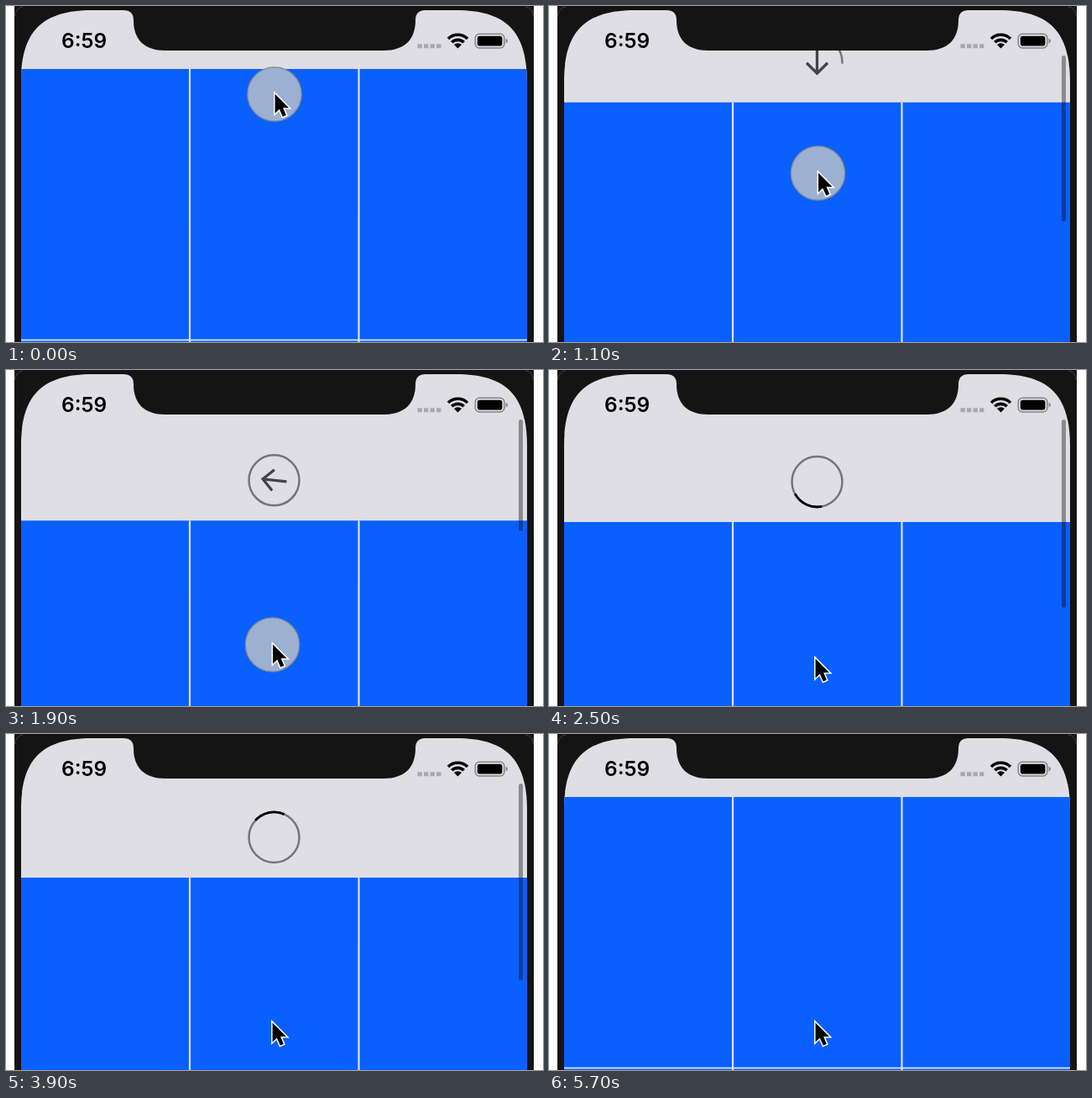
Animation, 640 px wide and 400 px high, one loop 5800 ms. Source, as an HTML page:

```html
<!DOCTYPE html>
<html lang="en">
<head>
<meta charset="utf-8">
<title>Pull to refresh</title>
<style>
  html, body { margin: 0; width: 100%; height: 100%; overflow: hidden; background: #fff; }
  svg { display: block; width: 640px; height: 400px; }
  .clock { font: 600 24.5px Inter, "Liberation Sans", sans-serif; }
</style>
</head>
<body>
<svg viewBox="0 0 640 400">
  <defs>
    <clipPath id="screen">
      <path d="M18 90C18 30 43 5 103 5H140Q152 5 152 17C152 40 165 53 190 53H450C475 53 488 40 488 17Q488 5 500 5H536C596 5 621 30 621 90V400H18Z"/>
    </clipPath>
  </defs>

  <rect x="10" width="619" height="400" fill="#141414"/>
  <path d="M10.5 12Q11 3 20 .5M628.5 12Q628 3 619 .5" fill="none" stroke="#444"/>

  <g clip-path="url(#screen)">
    <rect width="640" height="400" fill="#dfdee5"/>
    <g id="header" fill="none">
      <circle id="ring" r="30" stroke="#757479" stroke-width="2.5" pathLength="100" transform="rotate(-90)"/>
      <path id="arrow" d="M0-15V13M-12.5 1L0 13.5 12.5 1" stroke="#444347" stroke-width="3.3"/>
      <circle id="arc" r="30" stroke="#000" stroke-width="2.8" pathLength="360" stroke-dasharray="72 288"/>
    </g>
    <g id="grid">
      <rect x="18" width="603" height="400" fill="#0a5fff"/>
      <path d="M219 0V400M420.5 0V400" stroke="#dde3f4" stroke-width="2.2"/>
      <path d="M18 322.6H621" stroke="#dde3f4" stroke-width="1.8"/>
    </g>
    <rect id="bar" x="611" y="59" width="5" rx="2.5" fill="#000"/>
  </g>

  <text class="clock" x="66" y="50">6:59</text>
  <path d="M490.5 47.7H518.5" stroke="#a9a8ae" stroke-width="5" stroke-dasharray="5.4 2.1"/>
  <g transform="translate(538.5 50.5)">
    <path d="M0 0L-4.5-4.5A6.4 6.4 0 0 1 4.5-4.5Z"/>
    <path d="M-7.2-7.2A10.2 10.2 0 0 1 7.2-7.2M-11.5-11.5A16.3 16.3 0 0 1 11.5-11.5" fill="none" stroke="#000" stroke-width="3.7"/>
  </g>
  <rect x="559.3" y="33.2" width="34.6" height="16.8" rx="5" fill="none" stroke="#85848a" stroke-width="1.5"/>
  <rect x="561.8" y="35.7" width="29.6" height="11.8" rx="2.8"/>
  <path d="M595.6 38.8Q598 39.6 598 41.6T595.6 44.4Z" fill="#85848a"/>

  <circle id="touch" r="32.2" fill="#9cb0d1" stroke="#7e8894" stroke-width="1.3"/>
  <path id="cursor" d="M0 0V23L5.2 18 9.2 27 13.3 25.2 9.5 16.5H16.5Z" stroke="#fff" stroke-width="3" paint-order="stroke"/>
</svg>

<script>
const LOOP = 5800, STEP = 100;
const REST = 75, INSET = 96;
const RELEASE = 2300, DONE = 5000, HOME = 5450;
const DRAG_START = { x: 320, y: 105 };
const PULL = [ // from, to, y0, y1, x0, x1, ease
  [200, 1100, 105, 199, 320, 320.5, p => p ** 1.3],
  [1100, 1900, 199, 327, 320.5, 317.5, p => p],
  [1900, 2200, 327, 344, 317.5, 317, p => 1 - (1 - p) ** 3],
];
const SPIN = [[2500, 115], [3900, 618], [4800, 951]];

const el = id => document.getElementById(id);
const [header, ring, arrow, arc, grid, bar, touch, cursor] =
  ["header", "ring", "arrow", "arc", "grid", "bar", "touch", "cursor"].map(el);

const clamp = v => Math.min(1, Math.max(0, v));
const ramp = (t, a, b) => clamp((t - a) / (b - a));
const smooth = p => p * p * (3 - 2 * p);
const place = (node, x, y) => node.setAttribute("transform", `translate(${x} ${y})`);
const show = (node, on) => node.setAttribute("visibility", on ? "visible" : "hidden");

function finger(t) {
  const pos = { ...DRAG_START };
  for (const [a, b, y0, y1, x0, x1, ease] of PULL) {
    if (t < a) break;
    const p = ease(ramp(t, a, b));
    pos.x = x0 + (x1 - x0) * p;
    pos.y = y0 + (y1 - y0) * p;
  }
  return pos;
}

// Rubber-band resistance after a short dead zone
function stretch(y) {
  const pull = Math.max(0, y - DRAG_START.y - 20) * 0.55;
  return pull / (1 + pull / 1700);
}

function offset(t) {
  if (t < RELEASE) return stretch(finger(t).y);
  if (t >= DONE) return INSET * (1 - smooth(ramp(t, DONE, HOME)));
  if (t >= 3000) return INSET;
  const k = 0.0068 * (t - RELEASE);
  return INSET + (stretch(finger(RELEASE).y) - INSET) * (1 + k) * Math.exp(-k);
}

function spin(t) {
  const [a, b] = t < SPIN[1][0] ? SPIN : SPIN.slice(1);
  return a[1] + (b[1] - a[1]) * (t - a[0]) / (b[0] - a[0]);
}

function draw(t) {
  const pos = finger(t), off = offset(t), top = REST + off;
  const loading = t >= RELEASE && t < DONE;

  place(grid, 0, top);
  place(header, 319.5, top - 48);

  const progress = loading ? 1 : clamp((off - 20) / (INSET - 20));
  ring.setAttribute("stroke-dasharray", progress < 1 ? `${progress * 100} 200` : "none");
  show(ring, progress > 0);
  arrow.setAttribute("transform", `rotate(${180 * smooth(ramp(t, 1790, 2000))})`);
  show(arrow, t < RELEASE && off > 0);
  arc.setAttribute("transform", `rotate(${spin(t) - 36})`);
  show(arc, loading);

  const end = t < RELEASE ? 296 - off : 293 - Math.max(0, off - INSET);
  bar.setAttribute("height", end - 59);
  bar.setAttribute("opacity", 0.38 * ramp(t, 300, 600) * (1 - ramp(t, 4000, 4400)));

  place(touch, pos.x, pos.y);
  show(touch, t < RELEASE);
  place(cursor, pos.x + 0.6, pos.y - 0.3);
}

const start = performance.now();
function tick() {
  const t = (performance.now() - start) % LOOP;
  draw(Math.floor(t / STEP) * STEP);
  requestAnimationFrame(tick);
}
tick();
</script>
</body>
</html>
```
